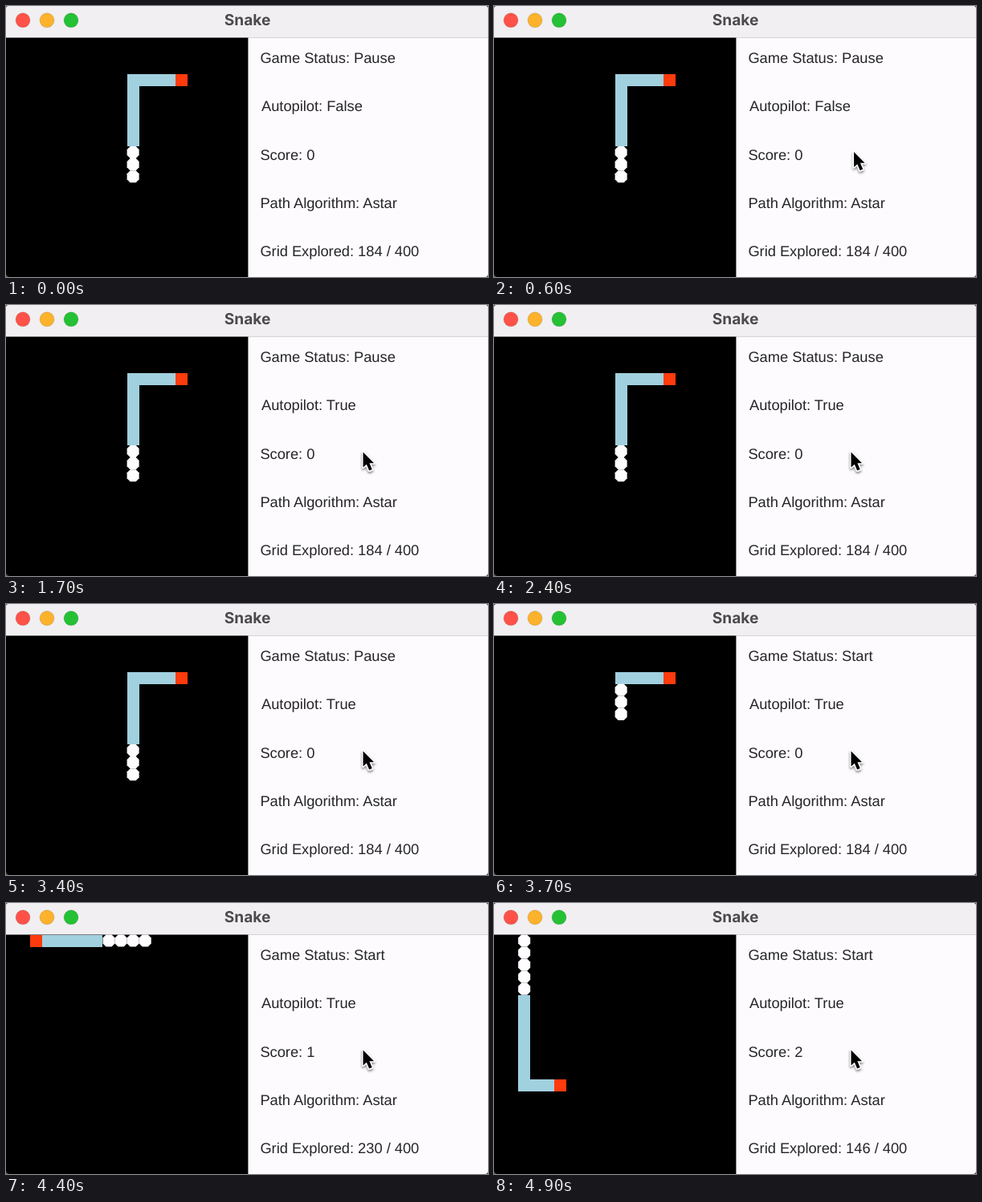
An HTML page for the animation above (5 s loop, 600 by 338 pixels).

```html
<!DOCTYPE html>
<html lang="en">
<head>
<meta charset="utf-8">
<title>Snake</title>
<style>
  html, body { margin: 0; width: 100%; height: 100%; overflow: hidden; background: #4b494b; }
  svg { display: block; width: 600px; height: 338px; }
  text { text-rendering: geometricPrecision; font-kerning: normal; }
  .title { font: 700 19.1px Inter, "Open Sans", sans-serif; fill: #4c4a4d; text-anchor: middle; }
  .info { font: 18.25px "Liberation Sans", Arial, sans-serif; fill: #252426; }
  .path { fill: #a1d0df; }
  .food { fill: #ff3b0d; }
  .body { fill: #fffdff; }
  .cells { shape-rendering: crispEdges; }
  .lights { stroke: #000; stroke-opacity: .12; }
</style>
</head>
<body>
<svg viewBox="0 0 600 338">
  <defs>
    <clipPath id="window"><rect width="600" height="338" rx="4"/></clipPath>
    <filter id="shadow" x="-50%" y="-50%" width="200%" height="200%">
      <feDropShadow dx="0" dy="2" stdDeviation="1.6" flood-opacity=".5"/>
    </filter>
  </defs>
  <g clip-path="url(#window)">
    <rect width="600" height="338" fill="#fdfbfe"/>
    <rect width="600" height="39.5" fill="#f1eff1"/>
    <rect x="301" y="39" width="299" height="1" fill="#d6d4d6"/>
    <rect y="39.5" width="301.4" height="298.5"/>
    <g id="board"></g>
    <g class="lights">
      <circle cx="21" cy="17.8" r="9" fill="#fe5249"/>
      <circle cx="51" cy="17.8" r="9" fill="#fdb22b"/>
      <circle cx="81" cy="17.8" r="9" fill="#24c135"/>
    </g>
    <text class="title" x="300.6" y="24">Snake</text>
    <g id="info"></g>
  </g>
  <path id="cursor" d="M0 0V19L4.3 15.2L7.6 23L11.2 21.5L7.9 13.8H13.6Z"
        stroke="#fff" stroke-width="3" paint-order="stroke" stroke-linejoin="round" filter="url(#shadow)"/>
</svg>
<script>
const LOOP = 5000, STEP = 100, CELL = 15.06, TOP = 39.5;
const START = 3500, AUTOPILOT_ON = 1500;
const $ = id => document.getElementById(id);

// Snake route: corner cells joined by straight runs
const corners = [[10, 11], [10, 3], [14, 3], [14, 0], [2, 0], [2, 12], [5, 12]];
const route = [corners[0]];
for (const [cx, cy] of corners.slice(1)) {
  let [x, y] = route[route.length - 1];
  while (x !== cx || y !== cy) {
    x += Math.sign(cx - x);
    y += Math.sign(cy - y);
    route.push([x, y]);
  }
}
const meals = [12, 27, 42];
const explored = [184, 230, 146];

// Cursor keys: time, x, y
const cursorKeys = [
  [100, 461, 3], [200, 459, 61], [300, 455, 117], [400, 451, 157], [500, 449, 177],
  [600, 448, 182], [700, 444.5, 183.5], [800, 444.5, 183.5], [1000, 445.5, 188],
  [1200, 446, 190], [1400, 444.5, 183.5]
];

function cursorAt(t) {
  const i = cursorKeys.findIndex(k => k[0] > t);
  if (i < 0) return cursorKeys[cursorKeys.length - 1].slice(1);
  if (i === 0) return null;
  const [t0, x0, y0] = cursorKeys[i - 1], [t1, x1, y1] = cursorKeys[i];
  const p = (t - t0) / (t1 - t0);
  return [x0 + (x1 - x0) * p, y0 + (y1 - y0) * p];
}

const lines = [316.4, 318, 316.4, 316.4, 316.4].map((x, i) => {
  const line = document.createElementNS("http://www.w3.org/2000/svg", "text");
  line.setAttribute("class", "info");
  line.setAttribute("x", x);
  line.setAttribute("y", 70.8 + i * 60.35);
  $("info").append(line);
  return line;
});

const origin = ([col, row]) => [col * CELL, TOP + row * CELL];

function square(cell, kind) {
  const [x, y] = origin(cell);
  return `<rect class="${kind}" x="${x}" y="${y}" width="${CELL}" height="${CELL}"/>`;
}

function segment(cell) {
  const [x, y] = origin(cell), cut = 4, side = CELL - 2 * cut;
  return `<path class="body" d="M${x + cut} ${y}h${side}l${cut} ${cut}v${side}` +
    `l${-cut} ${cut}h${-side}l${-cut} ${-cut}v${-side}z"/>`;
}

function draw(time) {
  const t = Math.floor((time % LOOP) / STEP) * STEP;
  const running = t >= START;
  const head = 2 + (running ? 1 + 2 * (t - START) / STEP : 0);
  const score = meals.filter(m => m <= head).length;
  const meal = meals[score];

  $("board").innerHTML =
    `<g class="cells">${route.slice(head + 1, meal).map(c => square(c, "path")).join("")}` +
    `${square(route[meal], "food")}</g>` +
    route.slice(head - 2 - score, head + 1).map(segment).join("");

  [
    `Game Status: ${running ? "Start" : "Pause"}`,
    `Autopilot: ${t >= AUTOPILOT_ON ? "True" : "False"}`,
    `Score: ${score}`,
    "Path Algorithm: Astar",
    `Grid Explored: ${explored[score]} / 400`
  ].forEach((text, i) => { lines[i].textContent = text; });

  const pos = cursorAt(t);
  $("cursor").style.display = pos ? "" : "none";
  if (pos) $("cursor").setAttribute("transform", `translate(${pos})`);
}

const begin = performance.now();
function tick() {
  draw(performance.now() - begin);
  requestAnimationFrame(tick);
}
tick();
</script>
</body>
</html>
```
